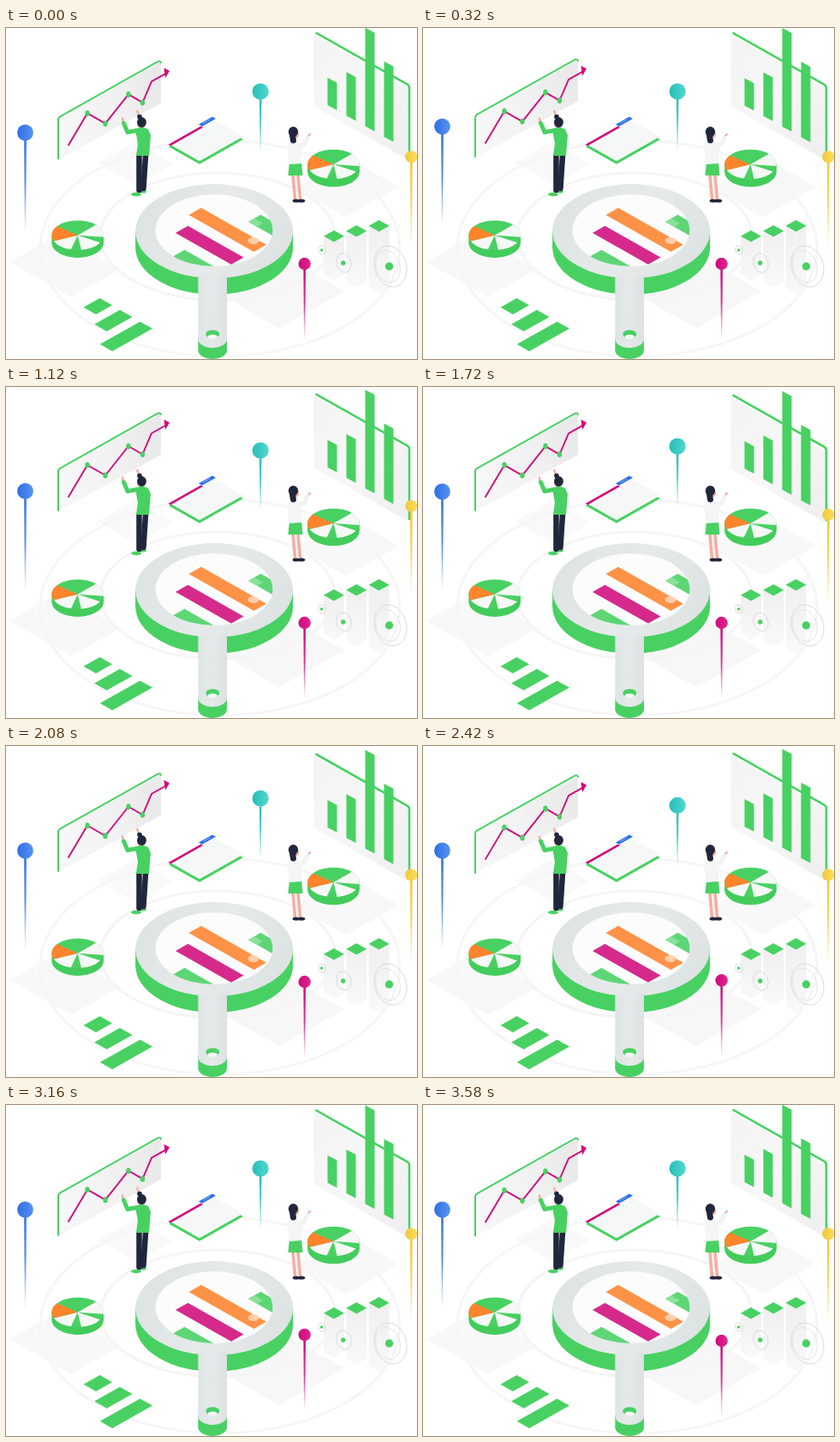
Animation of 480x386 px, one loop 3.6 s. Source, as an HTML page with a canvas:

```html
<!DOCTYPE html>
<html lang="en">
<head>
<meta charset="utf-8">
<title>Isometric analytics</title>
<style>
html, body { margin: 0; width: 100%; height: 100%; overflow: hidden; background: #fff; }
canvas { display: block; width: 480px; height: 386px; }
</style>
</head>
<body>
<canvas id="stage" width="480" height="386"></canvas>
<script>
const ctx = document.getElementById('stage').getContext('2d');
const LOOP = 3600;
const ISO = 0.565; // rise per pixel along both floor axes
const GREEN = '#48d162', MAGENTA = '#d10b7d', ORANGE = '#ff842c', BLUE = '#2d70e6';
const NAVY = '#20263c', SKIN = '#f8ada1', WHITE = '#f6f8f6';

function trace(points) {
  ctx.beginPath();
  points.forEach(([x, y]) => ctx.lineTo(x, y));
}
function poly(fill, ...points) {
  trace(points);
  ctx.fillStyle = fill;
  ctx.fill();
}
function limb(color, width, ...points) {
  trace(points);
  ctx.strokeStyle = color;
  ctx.lineWidth = width;
  ctx.stroke();
}
function oval(fill, x, y, rx, ry = rx) {
  ctx.beginPath();
  ctx.ellipse(x, y, rx, ry, 0, 0, Math.PI * 2);
  ctx.fillStyle = fill;
  ctx.fill();
}
function ring(color, width, x, y, rx, ry, turn = 0) {
  ctx.beginPath();
  ctx.ellipse(x, y, rx, ry, turn, 0, Math.PI * 2);
  ctx.strokeStyle = color;
  ctx.lineWidth = width;
  ctx.stroke();
}
function fade(x0, y0, x1, y1, ...colors) {
  const g = ctx.createLinearGradient(x0, y0, x1, y1);
  colors.forEach((c, i) => g.addColorStop(i / (colors.length - 1), c));
  return g;
}
// Flat rectangle on the floor: left corner, extent to the back right and to the front right
function slab(fill, x, y, back, front) {
  poly(fill, [x, y], [x + back, y - back * ISO],
    [x + back + front, y + (front - back) * ISO], [x + front, y + front * ISO]);
}
// Upright rectangle: top left corner, width, slope of the top edge, height
function wall(fill, x, y, w, slope, h) {
  const end = y + w * slope;
  poly(fill, [x, y], [x + w, end], [x + w, end + h], [x, y + h]);
}
// Solid with an oval top
function disc(top, side, x, y, rx, ry, depth) {
  oval(side, x, y + depth, rx, ry);
  ctx.fillRect(x - rx, y, rx * 2, depth);
  oval(top, x, y, rx, ry);
}
function shifted(dy, drawPart) {
  ctx.save();
  ctx.translate(0, dy);
  drawPart();
  ctx.restore();
}
const hump = u => u <= 0 || u >= 1 ? 0 : Math.sin(Math.PI * u) ** 2;

function floor() {
  slab('#f8f8f8', 4, 273, 58, 72);
  slab('#f9f9f9', 107, 157, 43, 45);
  slab('#f8f8f8', 338, 187, 62, 59);
  slab('#f7f7f7', 172, 267, 76, 147);
  ring('#f6f6f6', 3, 250, 257, 210, 126);
  ring('#f5f5f5', 3, 247, 243, 137, 74);
}

function lineBoard() {
  wall(fade(62, 110, 182, 80, '#f7f7f7', '#f2f2f2', '#e9e9e9'), 61, 105, 120, -0.55, 48);
  ctx.beginPath();
  ctx.moveTo(61, 152);
  ctx.arcTo(61, 104, 177, 39, 4);
  ctx.lineTo(177, 39);
  ctx.quadraticCurveTo(180, 37.5, 181, 40);
  ctx.strokeStyle = GREEN;
  ctx.lineWidth = 2;
  ctx.stroke();
  const dots = [[95, 99], [116, 111], [143, 77], [159.5, 86.5]];
  limb(MAGENTA, 1.9, [73, 136], ...dots, [170, 62], [186, 53]);
  poly(MAGENTA, [184.5, 46], [191, 49.5], [186, 58]);
  dots.forEach(([x, y]) => oval(GREEN, x, y, 2.7, 3.5));
}

function barBoard() {
  wall(fade(360, 40, 470, 120, '#f4f4f4', '#f7f7f7', '#f0f0f0'), 359.5, 7, 110, 0.57, 84);
  ctx.beginPath();
  ctx.moveTo(362.5, 5.8);
  ctx.arcTo(471, 67, 471, 151, 5);
  ctx.lineTo(471, 151);
  ctx.strokeStyle = GREEN;
  ctx.lineWidth = 2.6;
  ctx.stroke();
}
function boardBars() {
  [32, 51, 115, 88].forEach((h, i) =>
    wall(GREEN, 375.5 + 22 * i, 90 + 12.3 * i - h, 11, 0.53, h));
}

function pie(x, y) {
  const rx = 30.3, ry = 17.2;
  disc(GREEN, '#43cc5c', x, y, rx, ry, 9);
  const slice = (color, from, to) => {
    ctx.beginPath();
    ctx.moveTo(x, y);
    ctx.ellipse(x, y, rx, ry, 0, from * Math.PI / 180, to * Math.PI / 180);
    ctx.fillStyle = color;
    ctx.fill();
  };
  for (let from = -45; from < 110; from += 75) slice(WHITE, from, from + 52);
  slice(ORANGE, 157, 218);
}

function book() {
  slab(GREEN, 190, 138.5, 51, 36);
  slab('#f6f7f7', 190, 135, 51, 36);
  slab(MAGENTA, 189.5, 136, 38, 2.6);
  slab(BLUE, 225, 112.5, 16, 4);
  limb('#a9c6fa', 0.7, [230, 111.5], [238, 107]);
}

function man() {
  oval(GREEN, 152, 194, 6, 2.2);
  oval(GREEN, 160, 190.5, 4, 2);
  limb(NAVY, 6.5, [163, 149], [160.5, 187]);
  limb(NAVY, 6.5, [155.5, 149], [155.5, 189]);
  limb(SKIN, 2.4, [137, 111], [136, 105.5]);
  limb(SKIN, 2.4, [156, 105], [153.3, 97]);
  limb(GREEN, 5, [156, 119], [142, 121.5], [137.5, 111]);
  poly(GREEN, [151, 119], [158, 115], [166, 118], [169, 125], [167, 149], [152, 149], [154, 135]);
  oval(SKIN, 156, 112, 3, 4);
  oval(NAVY, 158.5, 110, 5.4, 6);
  oval(NAVY, 156, 103.5, 2.8);
}

function woman() {
  for (const x of [335, 341]) {
    limb(SKIN, 3.6, [x, 171], [x + 2.5, 199]);
    oval(NAVY, x + 4, 201.5, 4.3, 2);
  }
  limb(SKIN, 2.4, [351, 128], [355, 124]);
  limb('#f0f2f3', 5, [342, 137], [348, 136], [352, 128]);
  poly(GREEN, [331, 156], [345, 156], [346.5, 172], [329.5, 172]);
  poly('#f3f5f6', [328, 138], [333, 132], [341, 132], [346, 138], [345, 158], [331, 159]);
  oval(SKIN, 339, 123.5, 3, 4.5);
  oval(NAVY, 335.5, 121, 5.6, 6);
  limb(NAVY, 7, [334, 122], [335.5, 131]);
}

function pillar(x, y, h) {
  const side = fade(0, y, 0, y + h, '#efefef', '#f8f8f8');
  wall(side, x - 12, y, 12, ISO, h);
  wall(side, x, y + 12 * ISO, 12, -ISO, h);
  slab(GREEN, x - 12, y, 12, 12);
}

// Tilted dial with a green core
function dial(x, y, r) {
  ring('#dadada', 1, x, y, r, r * 1.32, -0.3);
  oval(GREEN, x - r * 0.08, y, 1 + r * 0.2);
}

function magnifier() {
  disc(fade(151, 200, 335, 280, '#dde2e3', '#e6eaea', '#dce1e2'), GREEN, 243.2, 237, 92, 54.9, 19);

  ctx.save();
  oval('#fcfcfc', 243, 236, 68.5, 42);
  ctx.clip();
  ctx.globalAlpha = 0.87;
  slab(ORANGE, 213.5, 218, 14.5, 76);
  slab(MAGENTA, 198, 239, 14.5, 65);
  slab(GREEN, 194, 267, 14.5, 40);
  slab(GREEN, 283, 226, 14.5, 30);
  slab('#91e3a0', 283, 226, 7, 10);
  oval('#ffd7b9', 289, 248, 6.5, 4);
  ctx.restore();

  disc(GREEN, GREEN, 241.2, 363, 16.8, 10, 13);
  const metal = fade(224, 0, 258, 0, '#dfe4e5', '#e5e9e9', '#dce2e3');
  oval(metal, 241.2, 363, 16.8, 10);
  ctx.fillRect(224.4, 289, 33.6, 74);
  oval(GREEN, 241.3, 357, 8, 4.8);
  oval(WHITE, 241.3, 360, 5.6, 2.6);
}

function floorBars() {
  for (let i = 0; i < 3; i++) {
    const length = 19 * 1.57 ** i;
    slab(GREEN, 109.5 + 23.5 * i - length, 315 + 13.7 * i + length * ISO, length, 14.5);
  }
}

const pins = [
  { x: 22.5, y: 122, r: 9.4, stem: 117, rgb: '47,111,226', glow: '#5793f3', start: 0 },
  { x: 473.3, y: 150.3, r: 7, stem: 106, rgb: '239,201,58', glow: '#ffdc5c', start: 650 },
  { x: 297.2, y: 74, r: 9.6, stem: 72, rgb: '37,190,184', glow: '#53d8cf', start: 1470 },
  { x: 348.7, y: 275, r: 7.2, stem: 90, rgb: '207,10,124', glow: '#df2690', start: 2280 }
];
function pin({ x, y, r, stem, rgb, glow }) {
  const foot = y + stem;
  const paint = fade(0, y, 0, foot, `rgba(${rgb},1)`, `rgba(${rgb},.8)`, `rgba(${rgb},0)`);
  poly(paint, [x - 1.4, y], [x + 1.4, y], [x + 0.6, foot], [x - 0.6, foot]);
  oval(fade(x - r, 0, x + r, 0, `rgb(${rgb})`, glow), x, y, r);
}

function draw(t) {
  ctx.fillStyle = '#fff';
  ctx.fillRect(0, 0, 480, 386);
  const sway = hump(t / LOOP);
  const lift = hump((t / LOOP) ** 0.734); // rises faster than it sinks
  floor();
  shifted(0.4 - 8.9 * lift, lineBoard);
  shifted(4.2 * sway, barBoard);
  shifted(5.3 * sway, boardBars);
  book();
  man();
  pie(382.5, 159);
  woman();
  pie(83.7, 241.7);
  for (let i = 0; i < 3; i++) pillar(383 + 26.3 * i, 242.8 - 6 * i, 45 + 14 * i);
  dial(449, 278, 18.5);
  ring('#e4e4e4', 1, 446, 278, 14, 19, -0.3);
  dial(394.5, 274, 8.5);
  dial(369, 259, 4);
  magnifier();
  floorBars();
  pins.forEach(p => shifted(-13 * hump((t - p.start) / 1200), () => pin(p)));
}

ctx.lineJoin = ctx.lineCap = 'round';
function tick() {
  draw(performance.now() % LOOP);
  requestAnimationFrame(tick);
}
tick();
</script>
</body>
</html>
```
